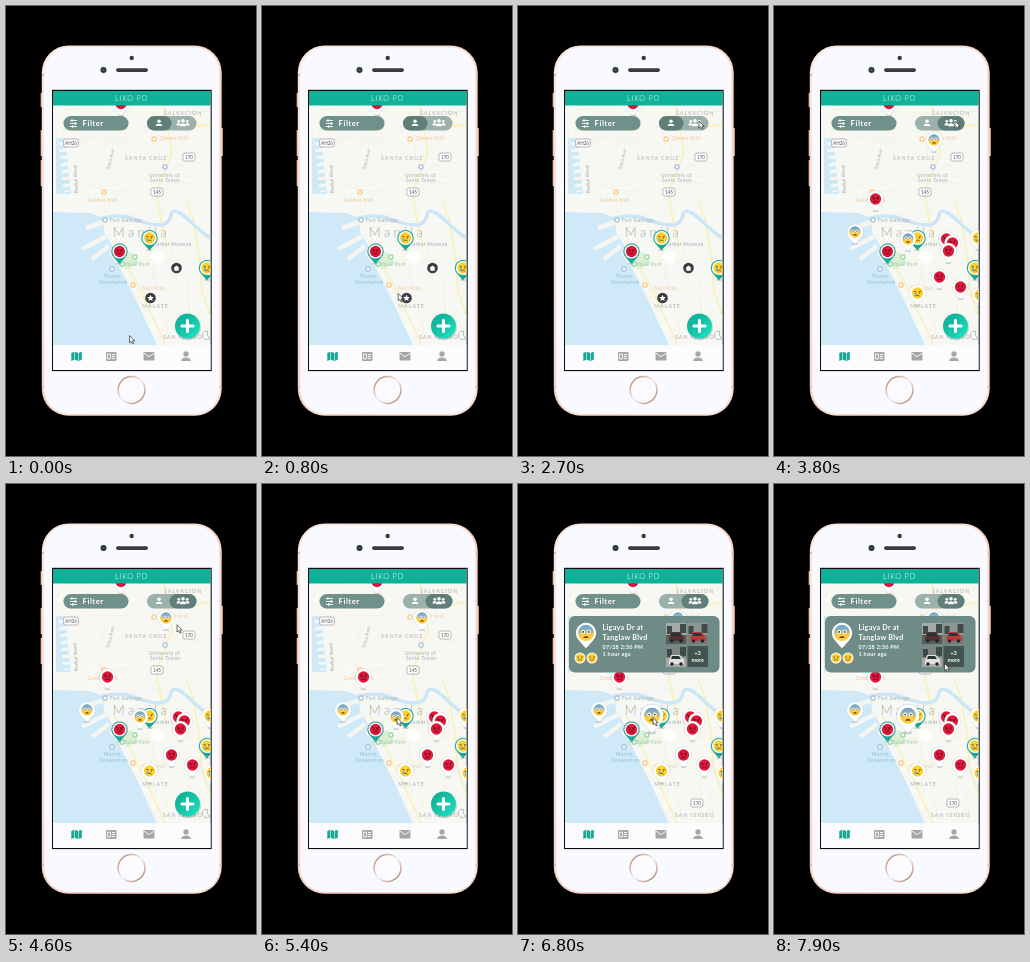
An HTML page for the animation above (8 s loop, 250x450 px).

```html
<!DOCTYPE html>
<html lang="en">
<head>
<meta charset="utf-8">
<title>Map app demo</title>
<style>
html, body { margin: 0; width: 100%; height: 100%; overflow: hidden; background: #000; }
svg { display: block; width: 250px; height: 450px; font-family: Lato, "Open Sans", sans-serif; }
.place { fill: #acaeb0; font-size: 5.4px; letter-spacing: 1px; }
.poi { font-size: 4.9px; letter-spacing: .28px; }
.hidden { display: none; }
</style>
</head>
<body>
<svg viewBox="0 0 250 450">
  <defs>
    <linearGradient id="rim" x2="1" y2="1">
      <stop stop-color="#fce8dc"/><stop offset=".5" stop-color="#f5d5c6"/><stop offset="1" stop-color="#f9dfd2"/>
    </linearGradient>
    <linearGradient id="fear" x2="0" y2="1">
      <stop stop-color="#5d9ee0"/><stop offset=".42" stop-color="#a9b9a0"/><stop offset=".62" stop-color="#ffcd3c"/>
    </linearGradient>
    <linearGradient id="ring" x2="1" y2="1">
      <stop stop-color="#b07a64"/><stop offset=".5" stop-color="#fbeee8"/><stop offset="1" stop-color="#a3725e"/>
    </linearGradient>
    <linearGradient id="mint" x2="1" y2="1">
      <stop stop-color="#12a891"/><stop offset=".5" stop-color="#15c4a8"/><stop offset="1" stop-color="#20e6c6"/>
    </linearGradient>
    <radialGradient id="glow">
      <stop offset=".55" stop-color="#fff"/><stop offset="1" stop-color="#fff" stop-opacity="0"/>
    </radialGradient>
    <clipPath id="mapClip"><rect x="47" y="99" width="157.5" height="240"/></clipPath>
    <clipPath id="screenClip"><rect x="47" y="85" width="157.5" height="279"/></clipPath>

    <g id="angry">
      <circle r="6.4" fill="#e0183c"/>
      <path d="M-4-2.8-1-1.1M4-2.8 1-1.1M-2.8 3.3Q0 .8 2.8 3.3" fill="none" stroke="#5a101d" stroke-width="1"/>
      <circle cx="-2.2" cy="-.4" r=".9" fill="#5a101d"/><circle cx="2.2" cy="-.4" r=".9" fill="#5a101d"/>
    </g>
    <g id="sad">
      <circle r="6.4" fill="#ffd12f"/>
      <path d="M-4-1.9-1.3-1.2M4-1.9 1.3-1.2M-2.2 3.5Q0 1 2.2 3.5" fill="none" stroke="#69441b" stroke-width="1"/>
      <path d="M-3.3 0h1.8v3.5h-1.8z" fill="#58b4e8"/>
      <circle cx="2.2" cy=".1" r=".8" fill="#69441b"/>
    </g>
    <g id="scared">
      <circle r="6.4" fill="url(#fear)"/>
      <circle cx="-2.2" cy="-.9" r="1.6" fill="#fff"/><circle cx="2.2" cy="-.9" r="1.6" fill="#fff"/>
      <circle cx="-2.2" cy="-.9" r=".75" fill="#4a3522"/><circle cx="2.2" cy="-.9" r=".75" fill="#4a3522"/>
      <path d="M-2.4 4Q0 .7 2.4 4z" fill="#74401f"/>
    </g>
    <path id="drop" d="M-7.2 3.7A8.1 8.1 0 1 1 7.2 3.7Q5 7 0 12.2-5 7-7.2 3.7Z"/>
    <g id="people">
      <circle cx="-4.2" cy="-1.7" r="1.4"/><circle cx="4.2" cy="-1.7" r="1.4"/><circle cy="-2.3" r="1.8"/>
      <path d="M-6.7 2.4Q-6.4 0-4 .1L-2.6.7-3.4 2.4ZM6.7 2.4Q6.4 0 4 .1L2.6.7 3.4 2.4ZM-3 3.3Q-3 .2 0 .2T3 3.3Z"/>
    </g>
    <g id="person"><circle cy="-2" r="2"/><path d="M-3.7 3.4Q-3.4.7 0 .7T3.7 3.4Z"/></g>
  </defs>

  <!-- phone -->
  <path d="M34.7 87h3v14h-3zM34.7 124h3v26h-3zM34.7 154h3v26h-3zM214 122h2.8v28h-2.8z" fill="#e6c3b4"/>
  <rect x="35.8" y="39.5" width="179.9" height="370.3" rx="27" fill="url(#rim)"/>
  <path d="M36 69h179.5M36 381h179.5" stroke="#d9c2b7" stroke-width="2"/>
  <rect x="38.1" y="41.2" width="175.3" height="366.8" rx="25" fill="#f9faff"/>
  <circle cx="97.5" cy="64" r="3" fill="#2d3237"/>
  <circle cx="97.5" cy="64" r="1.1" fill="#56616d"/>
  <circle cx="125.7" cy="52" r="2.2" fill="#3a3b3e"/>
  <rect x="110" y="62.3" width="32" height="3.6" rx="1.8" fill="#3a3b3e"/>
  <circle cx="125.5" cy="384" r="13.4" fill="#fbfbff" stroke="url(#ring)" stroke-width="1.5"/>
  <rect x="46" y="83.8" width="159.7" height="281.3" fill="#0c0c0c"/>

  <g clip-path="url(#screenClip)">
    <rect x="47" y="85" width="158" height="279" fill="#fff"/>
    <g clip-path="url(#mapClip)">
      <rect x="47" y="99" width="158" height="240" fill="#f7f7f3"/>
      <g id="roads" fill="none"></g>
      <g fill="#d0e9f8">
        <path d="M50 132h9l6 56H50Z"/>
        <path d="M47 206 84 207 97 212 98 226 106 240 104 249 112 258 119 272 133 300 142 320 151 339H47Z"/>
      </g>
      <path d="M56 136 61 186" stroke="#f7f7f3" stroke-width="7" stroke-dasharray="3 4"/>
      <path d="M98 216 80 222M101 230 76 243M103 240 86 253" stroke="#f5f6f2" stroke-width="4.5"/>
      <path d="M94 213Q113 207 128 213T153 219 165 209 184 215 205 232" fill="none" stroke="#cbe7f7" stroke-width="3.5"/>
      <path d="M115 250 126 246 133 258 120 263Z" fill="#dcefd4"/>
      <g id="labels"></g>
      <circle cx="151.5" cy="251.5" r="8" fill="url(#glow)"/>
      <g id="spots">
        <circle cx="170.5" cy="262" r="5.3" fill="#383d40"/>
        <path d="M167.4 262.3l3.1-2.9 3.1 2.9h-.9v2.5h-4.4v-2.5z" fill="#fff"/>
        <circle cx="144.5" cy="292" r="5.3" fill="#383d40"/>
        <path d="M144.5 288.7l1 2.2 2.4.2-1.8 1.6.5 2.4-2.1-1.3-2.1 1.3.5-2.4-1.8-1.6 2.4-.2z" fill="#fff"/>
      </g>
      <g id="crowd"></g>
      <g id="mine"></g>
      <g id="picked"></g>
    </g>

    <rect x="47" y="85" width="158" height="14.5" fill="#0fb299"/>
    <text x="125.5" y="95" fill="#fff" font-size="7.4" font-weight="300" text-anchor="middle" letter-spacing=".7">LIKO PO</text>

    <!-- controls -->
    <rect x="57.5" y="110" width="65" height="14.6" rx="7.3" fill="#70908a"/>
    <path d="M64 114.5h7M64 117.5h7M64 120.5h7" stroke="#fff" stroke-width=".9"/>
    <path d="M66 113.3v2.4M69.4 116.3v2.4M66.8 119.3v2.4" stroke="#fff" stroke-width="1.2"/>
    <text x="76.5" y="120.2" fill="#fff" font-size="7.8" font-weight="700" letter-spacing=".5">Filter</text>
    <rect x="141" y="110" width="49.5" height="14.6" rx="7.3" fill="#9db1ac"/>
    <rect id="knob" x="141" y="110" width="24.5" height="14.6" rx="7.3" fill="#607f79"/>
    <use href="#person" transform="translate(153 117) scale(.9)" fill="#fff"/>
    <use href="#people" x="177" y="117" fill="#fff"/>

    <g id="fab">
      <path d="M202 325.5a4.2 4.2 0 1 0 2 6.4 4.4 4.4 0 0 1-2-6.4" fill="none" stroke="#a9abad" stroke-width=".8"/>
      <circle cx="182" cy="321.5" r="12.8" fill="#27635b" opacity=".25"/>
      <circle cx="181.5" cy="320" r="12.5" fill="url(#mint)"/>
      <path d="M176 320h11M181.5 314.5v11" stroke="#fff" stroke-width="3" stroke-linecap="round"/>
    </g>

    <g id="card">
      <rect x="51" y="132" width="150.5" height="56.5" rx="6" fill="#6e8b86"/>
      <g transform="translate(68 149) scale(1.25)"><use href="#drop" fill="#fff"/><use href="#scared"/></g>
      <circle cx="62" cy="174" r="5.5" fill="#fff"/><use href="#sad" transform="translate(62 174) scale(.7)"/>
      <circle cx="74" cy="174" r="5.5" fill="#fff"/><use href="#sad" transform="translate(74 174) scale(.7)"/>
      <g fill="#fff" font-weight="700" letter-spacing=".3">
        <text x="84.5" y="146" font-size="7.1">Ligaya Dr at</text>
        <text x="84.5" y="155.6" font-size="7.1">Tanglaw Blvd</text>
        <text x="84.5" y="165" font-size="5.4">07/28 2:30 PM</text>
        <text x="84.5" y="171.6" font-size="5.4">1 hour ago</text>
      </g>
      <g id="photos"></g>
      <rect x="169.5" y="162" width="20.5" height="21" fill="#43534f"/>
      <g fill="#fff" font-size="5.3" font-weight="700" text-anchor="middle">
        <text x="179.7" y="171">+3</text><text x="179.7" y="177.5">more</text>
      </g>
    </g>

    <!-- tabs -->
    <rect x="47" y="339" width="158" height="25" fill="#fcfcff"/>
    <path d="M65.3 347l3.1-1.2v8l-3.1 1.2zM69 345.8l3 1.2v8l-3-1.2zM72.6 347l3.2-1.2v8l-3.2 1.2z" fill="#13a892"/>
    <g fill="#a4a6a8">
      <rect x="100" y="346" width="10.5" height="9" rx="1"/>
      <rect x="137.5" y="346" width="11" height="8.5" rx="1"/>
      <use href="#person" transform="translate(180 350.5) scale(1.3)"/>
    </g>
    <path d="M101.5 348.2h3v4.8h-3zM106 348.5h3M106 350.5h3M106 352.5h3M138 347.2l5 3.4 5-3.4" fill="none" stroke="#fff" stroke-width=".9"/>
  </g>

  <path id="cursor" d="M0 0V7.3L1.7 5.8 2.9 8.4 4.1 7.9 3 5.3H5.2Z" fill="#fff" stroke="#333" stroke-width=".7"/>
</svg>

<script>
const LOOP = 8000, GROUP_AT = 3000, CARD_AT = 5900;
const $ = id => document.getElementById(id);
const add = (id, markup) => $(id).insertAdjacentHTML("beforeend", markup);

let seed = 19;
const rand = () => (seed = seed * 16807 % 2147483647) / 2147483647;

// Faint street grid with a slight, random lean
function street(x, y, dx, dy, color) {
  add("roads", `<path d="M${x} ${y}l${dx} ${dy}" stroke="${color}" stroke-width=".6"/>`);
}
for (let i = 0; i < 50; i++) {
  const x = 45 + rand() * 150, y = 95 + rand() * 235, len = 20 + rand() * 45;
  const lean = (rand() - .5) * 18;
  const color = i % 3 ? "#eeeeeb" : "#fff";
  if (i % 2) street(x, y, len, lean - 5, color);
  else street(x, y, lean - 4, len, color);
}
const avenues = [
  "M47 124Q85 127 113 112T205 122", "M82 99 76 145 94 181 101 210",
  "M125 99 117 142 128 177 126 212 146 261 166 339", "M47 170 88 178 132 168 165 152 205 160",
  "M111 252 151 256 205 250", "M126 294 159 284 205 290"
];
const highways = [
  "M109 232 116 249 139 294 159 339", "M158 99 166 147 150 187 157 224 161 240",
  "M161 112 182 122 205 118", "M180 194 187 214 193 250 196 285 205 312"
];
const road = (color, width) => d =>
  add("roads", `<path d="${d}" stroke="${color}" stroke-width="${width}"/>`);
avenues.forEach(road("#f9f3e2", 1.2));
highways.forEach(road("#faf1b2", 1.5));

function label(text, x, y, cls, extra = "") {
  add("labels", `<text x="${x}" y="${y}" class="${cls}" ${extra}>${text}</text>`);
}
function poi(x, y, color) {
  add("labels", `<circle cx="${x}" cy="${y}" r="2.9" fill="${color}"/><circle cx="${x}" cy="${y}" r="1.2" fill="#fff"/>`);
}
function shield(x, y, text) {
  const w = text.length * 2.7 + 4;
  add("labels", `<rect x="${x - w / 2}" y="${y - 4}" width="${w}" height="8" rx="2" fill="#fff" stroke="#a4a6a7" stroke-width=".8"/>
    <text x="${x}" y="${y + 1.7}" font-size="4.6" font-weight="700" text-anchor="middle" fill="#77797a">${text}</text>`);
}
label("SANTA CRUZ", 119, 153.5, "place");
label("SALVACION", 158, 109, "place");
label("MALATE", 136, 302, "place");
label("SAN ISIDRO", 157, 333, "place");
label("Manila", 106.5, 231, "", 'font-size="13.5" font-weight="300" letter-spacing="3.2" fill="#a8abad"');
label("Fort Santiago", 104, 216, "poi", 'fill="#9babb8"');
label("University of", 143, 170.5, "poi", 'fill="#a9adb0"');
label("Santo Tomas", 144, 176, "poi", 'fill="#a9adb0"');
label("Harbor Museum", 147, 240, "poi", 'fill="#9babb8"');
label("Bulak Park", 118, 259.5, "poi", 'fill="#91c7a6"');
label("Marine", 98, 272, "poi", 'fill="#92bdd0"');
label("Oceanarium", 93, 277.5, "poi", 'fill="#92bdd0"');
label("Garden Mall", 82, 195.5, "poi", 'fill="#efc48f"');
label("Corner Grill", 154, 134, "poi", 'fill="#efc48f"');
label("Bay Hotel", 136, 284, "poi", 'fill="#efc9a8"');
label("Radial Road", 72, 187, "poi", 'fill="#999" transform="rotate(-93 72 187)"');
label("Ilaya Ave", 103, 164, "poi", 'fill="#aaa" transform="rotate(-75 103 164)"');
[[148, 133], [98, 186], [127, 279]].forEach(p => poi(...p, "#f7d29f"));
[[99, 214], [159, 161], [106, 263]].forEach(p => poi(...p, "#b9cce0"));
[[116, 258], [129, 251]].forEach(p => poi(...p, "#a9dcbb"));
shield(65, 137, "AH26");
shield(183, 151, "170");
shield(151, 186, "145");
shield(179, 319, "170");

function pin(layer, face, x, y, rim, size = 1) {
  add(layer, `<g transform="translate(${x} ${y}) scale(${size})">
    <ellipse cy="12" rx="3" ry="1" fill="#456" opacity=".25"/>
    <use href="#drop" fill="${rim}" stroke="#7d8a8c" stroke-opacity=".3" stroke-width=".5"/>
    <circle r="7.1" fill="#fff"/><use href="#${face}" transform="scale(.88)"/></g>`);
}
const crowd = [
  ["scared", 160, 134], ["angry", 101.5, 193], ["scared", 81, 226], ["angry", 172.5, 233],
  ["angry", 178.5, 237], ["angry", 174.5, 245], ["sad", 204, 232], ["angry", 165.5, 271],
  ["angry", 186.5, 281], ["sad", 143.5, 287], ["sad", 206, 289]
];
crowd.forEach(p => pin("crowd", ...p, "#fff"));
pin("mine", "angry", 115, 97.5, "#fff");
[["angry", 113.5, 245.5], ["sad", 143.5, 232], ["sad", 201, 262]]
  .forEach(p => pin("mine", ...p, "#17a995"));
pin("picked", "scared", 0, 0, "#fff");

// Street photos reduced to flat shapes
function photo(x, y, sky, ground, car) {
  add("photos", `<g transform="translate(${x} ${y})">
    <rect width="20.5" height="21" fill="${sky}"/><path d="M0 12h20.5v9H0z" fill="${ground}"/>
    <path d="M1 3h5v8H1zM14 1h6v9h-6z" fill="#404a49"/>
    <path d="M3 15l2-6h9l4 5v4H3z" fill="${car}"/><path d="M6 10h7l2 3H5z" fill="#27343a"/>
    <circle cx="6" cy="18" r="1.7" fill="#202527"/><circle cx="15" cy="18" r="1.7" fill="#202527"/></g>`);
}
photo(148, 139, "#a3aaa7", "#595e60", "#50332f");
photo(169.5, 139, "#8d9694", "#777b7a", "#b83938");
photo(148, 162, "#7e8685", "#a9aaa8", "#e1e2df");

// Cursor stops: time, x, y
const path = [
  [0, 123.5, 329.5], [500, 123.5, 329.5], [1500, 182, 136], [1900, 182, 136],
  [2500, 181, 115], [4300, 181, 115], [5300, 135, 233.5], [7000, 135, 233.5],
  [7700, 170.5, 179.5], [LOOP, 170.5, 179.5]
];
const ease = k => k * k * (3 - 2 * k);
const clamp = v => Math.max(0, Math.min(1, v));

function cursorAt(t) {
  const i = path.findIndex(p => p[0] > t);
  const [t0, x0, y0] = path[i - 1], [t1, x1, y1] = path[i];
  const k = ease((t - t0) / (t1 - t0));
  return [x0 + (x1 - x0) * k, y0 + (y1 - y0) * k];
}
function show(id, on) { $(id).classList.toggle("hidden", !on); }

function draw(t) {
  const group = t >= GROUP_AT, open = t >= CARD_AT;
  $("knob").setAttribute("x", group ? 163.5 : 141);
  $("knob").setAttribute("width", group ? 27 : 24.5);
  show("spots", !group);
  show("crowd", group);
  show("picked", group);
  show("card", open);
  show("fab", !open);
  const grow = 1 + .42 * ease(clamp((t - CARD_AT) / 200));
  $("picked").setAttribute("transform", `translate(134 ${233 - (grow - 1) * 3}) scale(${grow})`);
  $("cursor").setAttribute("transform", `translate(${cursorAt(t)})`);
}
const start = performance.now();
function tick() {
  draw((performance.now() - start) % LOOP);
  requestAnimationFrame(tick);
}
tick();
</script>
</body>
</html>
```
